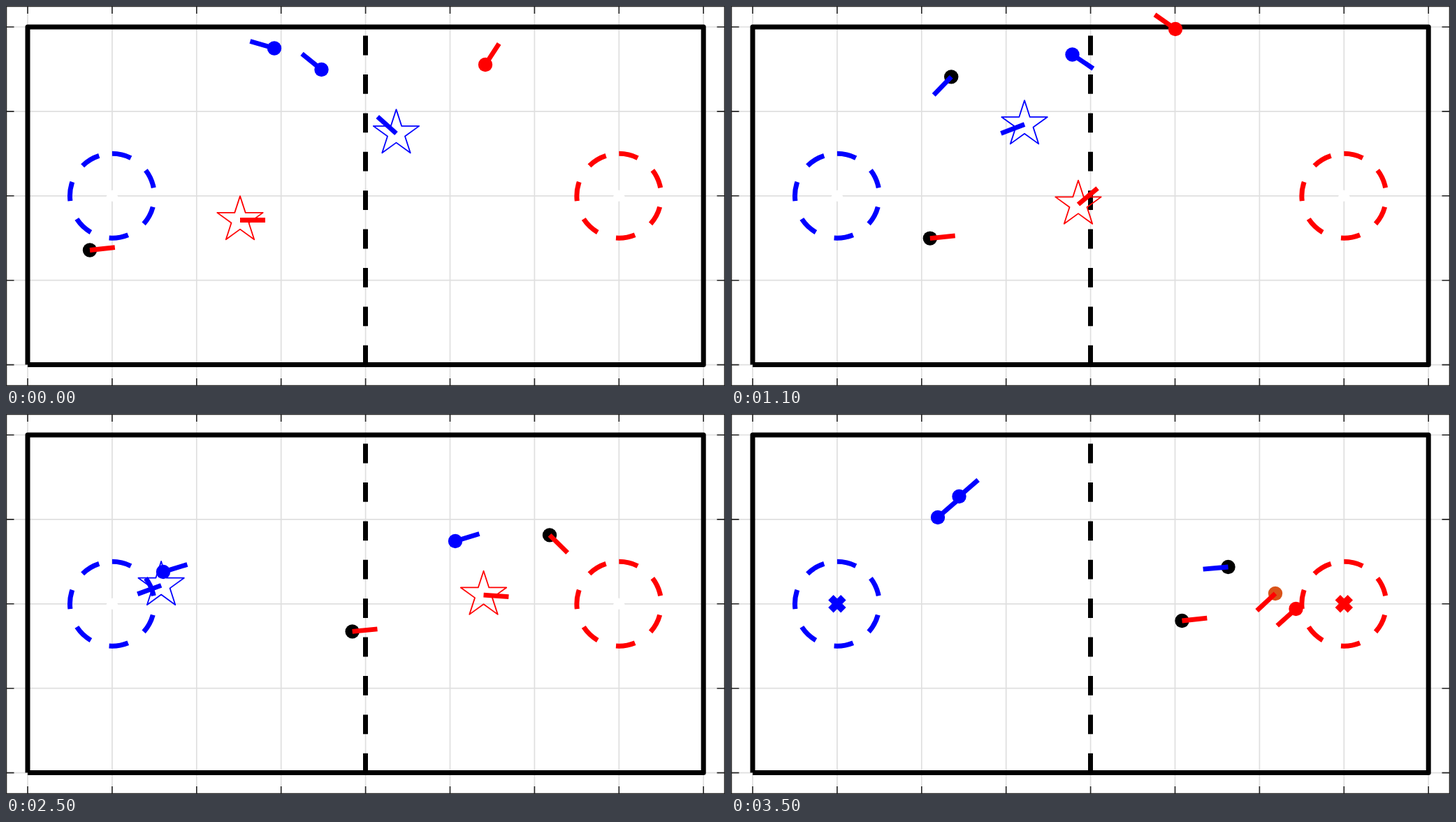
An HTML page for the animation above (3.6 s loop, 1029 by 544 pixels).

```html
<!DOCTYPE html>
<html lang="en">
<head>
<meta charset="utf-8">
<title>Capture the flag</title>
<style>
  html, body { margin: 0; width: 100%; height: 100%; overflow: hidden; background: #fff; }
  svg { display: block; width: 100%; height: 100%; fill: none; }
  .grid { stroke: #dfdfdf; stroke-width: 1.7; }
  .ticks { stroke: #262626; stroke-width: 1.6; }
  .wall { stroke: #000; stroke-width: 7; stroke-linejoin: round; }
  .dashed { stroke-width: 7; stroke-dasharray: 27.8 27.6; }
  .cross { stroke-width: 10.5; }
  .heading { stroke-width: 6.8; }
  .star { stroke-width: 1.8; stroke-linejoin: round; }
</style>
</head>
<body>
<svg id="stage" viewBox="0 0 1029 544"></svg>
<script>
const STEP_MS = 100, STEPS = 36, SPEED = 15;
const LEFT = 31, TOP = 30, CELL = 120.9;
const RIGHT = LEFT + 8 * CELL, BOTTOM = TOP + 4 * CELL;
const BLUE = '#00f', RED = '#f00', BLACK = '#000', ORANGE = '#d95319';
const stage = document.getElementById('stage');

function add(parent, tag, attributes) {
  const node = document.createElementNS('http://www.w3.org/2000/svg', tag);
  for (const name in attributes) node.setAttribute(name, attributes[name]);
  parent.appendChild(node);
  return node;
}

function drawField() {
  let grid = '', ticks = 'M.5 .5H1028.5V543.5H.5Z';
  for (let x = LEFT; x < 1029; x += CELL) {
    grid += `M${x} 0V544`;
    ticks += `M${x} 0v11M${x} 544v-11`;
  }
  for (let y = TOP; y < 544; y += CELL) {
    grid += `M0 ${y}H1029`;
    ticks += `M0 ${y}h11.5M1029 ${y}h-11.5`;
  }
  add(stage, 'path', { d: grid, class: 'grid' });
  add(stage, 'path', { d: ticks, class: 'ticks' });
  add(stage, 'path', {
    d: `M${LEFT} ${BOTTOM}V${TOP}H${RIGHT}V${BOTTOM}H${LEFT}`, class: 'wall'
  });
  add(stage, 'path', { d: `M514.5 ${BOTTOM}V${TOP}`, class: 'dashed', stroke: BLACK });
}

// Draws a home zone and returns its flag cross.
function drawZone(column, color) {
  const x = LEFT + column * CELL, y = TOP + 2 * CELL, r = CELL / 2;
  add(stage, 'path', {
    d: `M${x} ${y - r}a${r} ${r} 0 0 1 0 ${2 * r}a${r} ${r} 0 0 1 0 ${-2 * r}`,
    class: 'dashed', stroke: color
  });
  return add(stage, 'path', {
    d: `M${x - 9} ${y - 9}l18 18m0 -18l-18 18`, class: 'cross'
  });
}

function starPoints(radius) {
  return Array.from({ length: 10 }, (_, i) => {
    const r = i % 2 ? radius * 0.382 : radius, a = i * Math.PI / 5;
    return `${r * Math.sin(a)},${-r * Math.cos(a)}`;
  }).join(' ');
}

// Waypoints: step, x, y, heading. Two waypoints at one place make a sharp turn.
const agents = [
  { team: RED, looks: { 0: BLACK },
    route: [[0, 120, 349.5, -6], [35, 645.5, 296, -6]] },
  { team: BLUE, looks: { 0: BLUE, 5: BLACK, 23: BLUE },
    route: [
      [0, 384, 60.5, 196], [5, 378, 36.5, 350],
      [5, 378, 36.5, 134], [22, 200, 220.5, 134],
      [22, 200, 220.5, 90], [25, 225, 226, -17], [28, 262.5, 202, -45], [35, 326.5, 118, -41]
    ] },
  { team: BLUE, looks: { 0: BLUE, 34: BLACK },
    route: [
      [0, 451.5, 91, 219], [7, 431.5, 54, -8], [11, 488.5, 69.5, 34], [19, 559.5, 160.5, 45],
      [25, 643, 182, -17], [28, 684, 188, 23], [33, 742, 216, 25],
      [33, 742, 216, 175], [35, 711.5, 219, 175]
    ] },
  { team: RED, looks: { 0: RED, 12: BLACK, 31: RED, 35: ORANGE },
    route: [
      [0, 686, 84, -57], [7, 693, 48, 172], [11, 636, 33, 215],
      [11.8, 636, 33, 45], [30, 831.5, 226.5, 45],
      [30, 831.5, 226.5, 160], [35, 779, 257, 137]
    ] },
  { team: BLUE, looks: { 0: 'star', 27: BLUE },
    route: [
      [0, 558.5, 182.5, 222], [7, 476.5, 148.5, 160], [26, 208, 250.5, 160],
      [26, 208, 250.5, -35], [28, 232, 232, -45], [35, 296, 148, -41]
    ] },
  { team: RED, looks: { 0: 'star', 35: RED },
    route: [
      [0, 335, 306.5, 0], [7, 440.5, 300, -3], [11, 497, 284, -40], [19, 593, 252.5, 4],
      [34, 819.5, 269, 4], [34, 819.5, 269, 138], [35, 808.5, 279, 138]
    ] }
];

drawField();
const flags = [
  { node: drawZone(1, BLUE), color: BLUE, scored: 35 },
  { node: drawZone(7, RED), color: RED, scored: 27 }
];

for (const agent of agents) {
  agent.group = add(stage, 'g', {});
  agent.star = add(agent.group, 'polygon', {
    points: starPoints(34.4), class: 'star', stroke: agent.team
  });
  agent.dot = add(agent.group, 'circle', { r: 10.2 });
  agent.heading = add(agent.group, 'path', {
    d: 'M0 0H36', class: 'heading', stroke: agent.team
  });
}

// Steers along a Hermite curve whose end tangents are the headings at cruising speed.
function poseAt(route, step) {
  const next = Math.max(1, route.findIndex(point => point[0] >= step));
  const [t0, x0, y0, a0] = route[next - 1], [t1, x1, y1, a1] = route[next];
  const span = t1 - t0, u = (step - t0) / span, reach = SPEED * span;

  function along(from, to, project) {
    const v0 = reach * project(a0 * Math.PI / 180), v1 = reach * project(a1 * Math.PI / 180);
    const b = 3 * (to - from) - 2 * v0 - v1, c = 2 * (from - to) + v0 + v1;
    return [from + u * (v0 + u * (b + u * c)), v0 + u * (2 * b + 3 * u * c)];
  }

  const [x, dx] = along(x0, x1, Math.cos), [y, dy] = along(y0, y1, Math.sin);
  return { x, y, angle: Math.atan2(dy, dx) * 180 / Math.PI };
}

function lookAt(looks, step) {
  return looks[Object.keys(looks).filter(start => start <= step).pop()];
}

function render(step) {
  for (const { route, looks, group, star, dot, heading } of agents) {
    const { x, y, angle } = poseAt(route, step);
    const look = lookAt(looks, step), isStar = look === 'star';
    group.setAttribute('transform', `translate(${x} ${y})`);
    heading.setAttribute('transform', `rotate(${angle})`);
    star.style.display = isStar ? '' : 'none';
    dot.style.display = isStar ? 'none' : '';
    if (!isStar) dot.setAttribute('fill', look);
  }
  for (const { node, color, scored } of flags) {
    node.setAttribute('stroke', step >= scored ? color : '#fff');
  }
}

function tick() {
  render(Math.floor(performance.now() / STEP_MS) % STEPS);
  requestAnimationFrame(tick);
}
tick();
</script>
</body>
</html>
```
